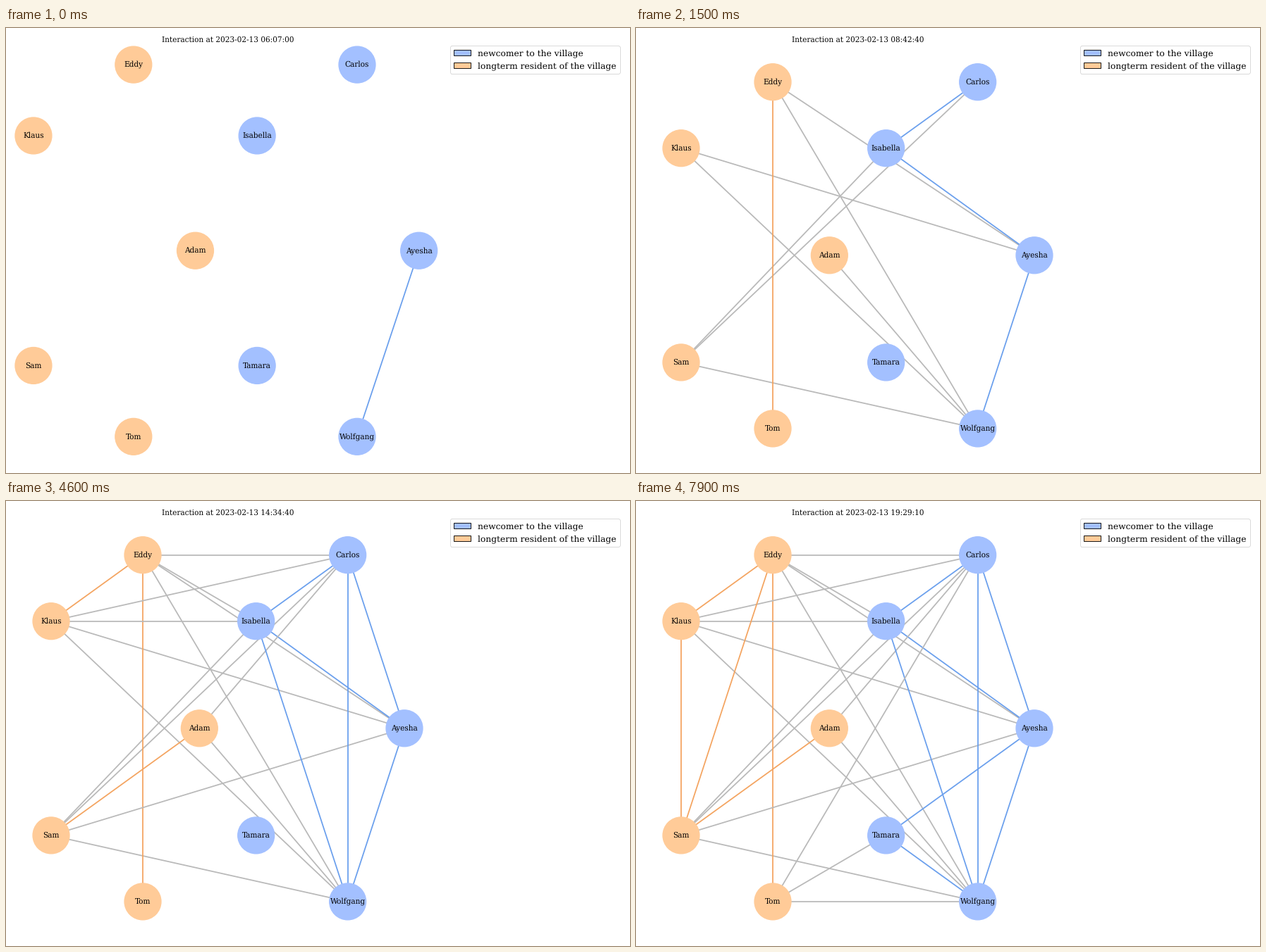
Animation of 885x632 px, one loop 8 s. Source, as a matplotlib script:

```python
import numpy as np
import matplotlib.pyplot as plt
from matplotlib.animation import FuncAnimation
from matplotlib.collections import LineCollection
from matplotlib.patches import Patch

W, H, DPI = 885, 632, 64
PT = 63.2 / DPI          # point scale of the 14 x 10 inch layout
FRAMES, INTERVAL = 80, 100

BLUE, ORANGE = "#A3C0FF", "#FFCB98"
BLUE_LINE, ORANGE_LINE, MIXED_LINE = "#6A9FED", "#F4A460", "#B9B9B9"

NEW = ["Ayesha", "Carlos", "Isabella", "Tamara", "Wolfgang"]
OLD = ["Adam", "Eddy", "Klaus", "Sam", "Tom"]

# frame at which two people first meet
MEETINGS = [
    (0, "Ayesha", "Wolfgang"), (2, "Klaus", "Ayesha"), (3, "Adam", "Wolfgang"),
    (4, "Sam", "Wolfgang"), (6, "Sam", "Isabella"), (7, "Klaus", "Wolfgang"),
    (8, "Eddy", "Ayesha"), (10, "Carlos", "Isabella"), (11, "Eddy", "Wolfgang"),
    (12, "Sam", "Carlos"), (13, "Isabella", "Ayesha"), (14, "Eddy", "Tom"),
    (16, "Carlos", "Ayesha"), (17, "Sam", "Ayesha"), (19, "Eddy", "Carlos"),
    (20, "Klaus", "Eddy"), (21, "Carlos", "Adam"), (22, "Adam", "Sam"),
    (26, "Eddy", "Isabella"), (28, "Klaus", "Isabella"),
    (30, "Isabella", "Wolfgang"), (31, "Klaus", "Carlos"),
    (33, "Carlos", "Wolfgang"), (56, "Carlos", "Tom"), (60, "Sam", "Eddy"),
    (66, "Klaus", "Sam"), (68, "Ayesha", "Tamara"), (70, "Tamara", "Wolfgang"),
    (71, "Tom", "Wolfgang"), (76, "Tom", "Tamara"),
]


def seconds(h, m, s):
    return h * 3600 + m * 60 + s


CLOCK_FRAMES = [0, 5, 15, 23, 34, 57, 79]
CLOCK = [seconds(6, 7, 0), seconds(7, 17, 20), seconds(8, 42, 40),
         seconds(10, 38, 40), seconds(12, 23, 20), seconds(16, 35, 0),
         seconds(19, 29, 10)]


def ring(names, cx):
    angles = 2 * np.pi * np.arange(len(names)) / len(names)
    return {n: (cx + np.cos(a), np.sin(a)) for n, a in zip(names, angles)}


pos = {**ring(NEW, 2.5), **ring(OLD, 0)}
nodes = np.array(list(pos.values()))


def line_color(a, b):
    if (a in NEW) != (b in NEW):
        return MIXED_LINE
    return BLUE_LINE if a in NEW else ORANGE_LINE


def view_limits(segments):
    """Bounds of all nodes and the padded edges, plus a 5 % margin."""
    ends = np.array(segments).reshape(-1, 2)
    lo, hi = ends.min(0), ends.max(0)
    pad = 0.05 * (hi - lo)
    lo = np.minimum(nodes.min(0), lo - pad)
    hi = np.maximum(nodes.max(0), hi + pad)
    margin = 0.05 * (hi - lo)
    return np.transpose([lo - margin, hi + margin])


def stamp(i):
    t = int(round(np.interp(i, CLOCK_FRAMES, CLOCK) / 10)) * 10
    return f"2023-02-13 {t // 3600:02d}:{t // 60 % 60:02d}:{t % 60:02d}"


plt.rcParams.update({"font.family": "DejaVu Serif", "font.size": 12 * PT,
                     "text.hinting": "none"})
fig = plt.figure(figsize=(W / DPI, H / DPI), dpi=DPI, facecolor="white")
left, right, top, bottom = 11.4, 617.6, 25.0, 620.6
ax = fig.add_axes([left / W, 1 - bottom / H, (right - left) / W, (bottom - top) / H])
ax.axis("off")

edges = LineCollection([], linewidths=2 * PT, zorder=1)
ax.add_collection(edges, autolim=False)
ax.scatter(*nodes.T, s=3500 * PT ** 2, c=[BLUE] * 5 + [ORANGE] * 5,
           linewidths=1.5 * PT, zorder=2, clip_on=False)
for name, (x, y) in pos.items():
    ax.text(x, y, name, size=12 * PT, ha="center", va="center", zorder=3)
title = ax.set_title("", fontsize=12 * PT, pad=6 * PT)
ax.legend(handles=[Patch(facecolor=BLUE, edgecolor="black",
                         label="newcomer to the village"),
                   Patch(facecolor=ORANGE, edgecolor="black",
                         label="longterm resident of the village")],
          loc="upper left", bbox_to_anchor=(1.01, 1.01), fontsize=14 * PT)


def update(i):
    met = [(a, b) for start, a, b in MEETINGS if start <= i]
    segments = [(pos[a], pos[b]) for a, b in met]
    edges.set_segments(segments)
    edges.set_color([line_color(a, b) for a, b in met])
    xlim, ylim = view_limits(segments)
    ax.set_xlim(xlim)
    ax.set_ylim(ylim)
    title.set_text(f"Interaction at {stamp(i)}")
    return edges, title


anim = FuncAnimation(fig, update, frames=FRAMES, interval=INTERVAL,
                     init_func=lambda: update(0), repeat=True, repeat_delay=0)
plt.show()
```
